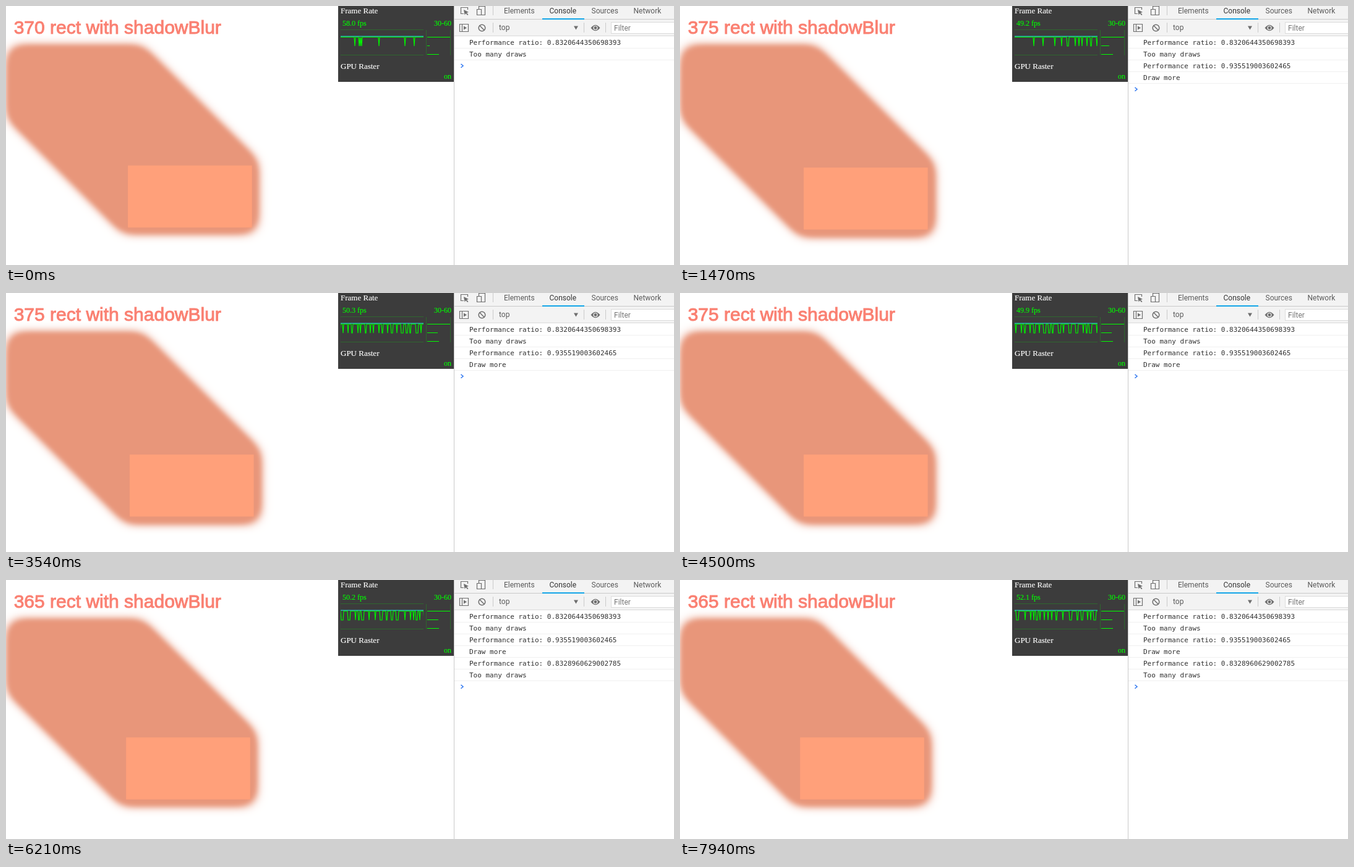
An HTML page with a canvas that plays this animation: 1080 by 420 pixels, repeating every 8 s.

```html
<!DOCTYPE html>
<html lang="en">
<head>
<meta charset="utf-8">
<title>Shadow load</title>
<style>
html, body { margin: 0; width: 100%; height: 100%; overflow: hidden; background: #fff; }
canvas, svg { position: absolute; left: 0; top: 0; display: block; }
text { white-space: pre; }
.title { font: 30px "Liberation Sans", Arial, sans-serif; fill: #fa8072; stroke: #fa8072; stroke-width: 1; }
.meter { font-family: "Liberation Serif", serif; }
.ui { font: 12px Roboto, sans-serif; fill: #5a5a5a; }
.log { font: 11px "DejaVu Sans Mono", monospace; fill: #303030; }
.icon { fill: none; stroke: #6e6e6e; stroke-width: 1.2; }
</style>
</head>
<body>
<svg id="stage" width="1080" height="420" viewBox="0 0 1080 420">
  <text id="title" class="title" x="12.7" y="45"></text>
  <rect id="front" width="200.5" height="100.5" fill="#ffa07a"/>
  <g class="meter">
    <rect x="537" width="187" height="123" fill="#3c3c3c"/>
    <g font-size="13" fill="#fff" stroke="#fff" stroke-width=".15">
      <text x="541" y="12">Frame Rate</text>
      <text x="541" y="102">GPU Raster</text>
    </g>
    <g font-size="12" fill="#0f0" stroke="#0f0" stroke-width=".15">
      <text id="fps" x="544" y="32"></text>
      <text x="720" y="32" text-anchor="end">30-60</text>
      <text x="720" y="118" text-anchor="end">on</text>
    </g>
    <path d="M541 38.5H675M541 79.5H675M679.5 39V80M718.5 39V80" stroke="#0f0" stroke-opacity=".22"/>
    <svg x="541" y="36" width="134" height="46" viewBox="541 36 134 46">
      <path id="graph" fill="none" stroke="#00f000" stroke-width="1.2"/>
    </svg>
    <path d="M541 48.5H675" stroke="#2c7878"/>
    <path d="M541 49.5H675" stroke="#30b0a4"/>
    <path id="bars" fill="none" stroke="#0f0" stroke-width="1.2"/>
  </g>
  <rect x="724" width="356" height="420" fill="#fff"/>
  <rect x="725" width="355" height="48" fill="#f3f3f3"/>
  <path d="M724.5 0V420M725 21.5H1080M787.5 0V15M787.5 27V43M934.5 27V43M969.5 27V43" stroke="#cacaca"/>
  <path d="M725 48.5H1080" stroke="#dadada"/>
  <rect x="978.5" y="26.5" width="110" height="18" fill="#fff" stroke="#dcdcdc"/>
  <rect x="867" y="20" width="68" height="2" fill="#12a5e8"/>
  <g class="ui">
    <text x="805" y="12">Elements</text>
    <text x="878.5" y="12" fill="#333">Console</text>
    <text x="946.5" y="12">Sources</text>
    <text x="1014.5" y="12">Network</text>
    <text x="797" y="39">top</text>
    <text x="983" y="40" fill="#777">Filter</text>
  </g>
  <g class="icon">
    <path d="M740 12.5H735.5V2.5H746.5V6"/>
    <path d="M740 6L748 10L744.7 11L747.5 14L746 15L743.5 12L741.6 14.5Z" fill="#6e6e6e" stroke="none"/>
    <path d="M764.5 5V.5H774.5V14.5H769M761.5 5.5H768.5V14.5H761.5Z"/>
    <path d="M733.5 29.5H747.5V41.5H733.5ZM737.5 29.5V41.5"/>
    <path d="M740 32.5L745 35.5L740 38.5Z" fill="#6e6e6e" stroke="none"/>
    <circle cx="769.5" cy="35.5" r="5.3" stroke-width="1.5"/>
    <path d="M765.8 31.8L773.2 39.2" stroke-width="1.5"/>
    <path d="M918 32.5H925L921.5 38.5Z" fill="#6e6e6e" stroke="none"/>
    <path d="M945.5 35.5Q953 26 960.5 35.5Q953 45 945.5 35.5Z" fill="#6e6e6e" stroke="none"/>
    <circle cx="953" cy="35.5" r="3" fill="#6e6e6e" stroke="#f3f3f3"/>
  </g>
  <g id="log" class="log"></g>
  <path id="prompt" d="M735.5 94L739 97L735.5 100" fill="none" stroke="#367cf1" stroke-width="1.6"/>
</svg>
<script>
const LOOP = 8000, FRAME = 90, SPEED = 0.05085;
const W = 440, H = 400, SIGMA = 10;
const $ = id => document.getElementById(id);

const states = [
  { from: 0, count: 370, rows: 2 },
  { from: 450, count: 375, rows: 4 },
  { from: 4590, count: 365, rows: 6 }
];
const rates = ["58.0", "54.6", "49.2", "50.1", "50.3", "49.9", "50.2", "51.0", "52.1"];
const lines = [
  "Performance ratio: 0.8320644350698393", "Too many draws",
  "Performance ratio: 0.935519003602465", "Draw more",
  "Performance ratio: 0.8328960629002785", "Too many draws"
];

// Slow samples along the frame graph: sparse at first, then seeded bursts
function makeDips() {
  let seed = 11;
  const rnd = () => (seed = seed * 16807 % 2147483647) / 2147483647;
  const list = [564, 571, 573, 575, 603, 645, 660];
  for (let x = 679; x < 1090;) {
    const run = Math.floor(1 + 3.5 * rnd() ** 2);
    for (let i = 0; i < run; i++) list.push(x++);
    x += Math.round((x < 710 ? 8 : 3) + 7 * rnd() ** 1.5);
  }
  return list;
}
const dips = makeDips();

// Smooth step with a Gaussian slope
const soft = z => 1 / (1 + Math.exp(-1.5976 * z - 0.07056 * z ** 3));
const span = (n, at, size) => Float32Array.from({ length: n }, (_, p) =>
  soft((p + 0.5 - at) / SIGMA) - soft((p + 0.5 - at - size) / SIGMA));

const corner = n => [200 - (375 - n) * 0.58, 262 - (375 - n) * 0.67];

// Accumulated blurred shadows of all rectangles; each pass stands for four of them
function shadow({ count }) {
  const [endX, endY] = corner(count);
  const clear = new Float32Array(W * H).fill(1);
  for (let i = 2; i < count; i += 4) {
    const k = i / count;
    const across = span(W, 13 + (endX - 13) * k, 200.5);
    const down = span(H, 75 + (endY - 75) * k, 100.5);
    for (let y = 0; y < H; y++) {
      if (down[y] < 0.001) continue;
      for (let x = 0; x < W; x++) clear[y * W + x] *= 1 - across[x] * down[y];
    }
  }
  const c = document.createElement("canvas");
  c.width = W;
  c.height = H;
  const g = c.getContext("2d");
  const img = g.createImageData(W, H);
  clear.forEach((v, i) => img.data.set([232, 150, 122, 255 * (1 - v ** 4)], i * 4));
  g.putImageData(img, 0, 0);
  document.body.insertBefore(c, $("stage"));
  return c;
}
const shadows = states.map(shadow);

$("log").innerHTML = lines.map((s, i) =>
  `<g><text x="749" y="${63 + 19 * i}">${s}</text>` +
  `<path d="M725 ${68.5 + 19 * i}H1080" stroke="#f0f0f0"/></g>`).join("");
const rows = [...$("log").children];

function graphPath(shift) {
  let d = "M540 50.5", last = 0;
  for (const p of dips) {
    const x = p - shift;
    if (x < 539 || x > 676) continue;
    if (x - last > 1) d += `${last ? `L${last + 1} 50.5` : ""}L${x - 1} 50.5`;
    d += `L${x} 65`;
    last = x;
  }
  return d + (last ? `L${last + 1} 50.5` : "") + "L676 50.5";
}

function draw(time) {
  const t = Math.floor(time / FRAME + 0.001) * FRAME;
  const state = states.filter(s => s.from <= t).pop();
  const [x, y] = corner(state.count);
  shadows.forEach((c, i) => c.style.visibility = states[i] === state ? "visible" : "hidden");
  rows.forEach((r, i) => r.setAttribute("display", i < state.rows ? "inline" : "none"));
  $("front").setAttribute("transform", `translate(${x} ${y})`);
  $("title").textContent = state.count + " rect with shadowBlur";
  $("prompt").setAttribute("transform", `translate(0 ${19 * (state.rows - 2)})`);
  $("fps").textContent = rates[Math.floor((t + 520) / 970)] + " fps";
  $("graph").setAttribute("d", graphPath(Math.round(t * SPEED)));
  const mid = Math.round(18 - 14 * Math.exp(-t / 1500));
  $("bars").setAttribute("d", `M681 50.5H718M681 64.5h${mid}M681 78.5h19`);
}

const start = performance.now();
function tick() {
  draw((performance.now() - start) % LOOP);
  requestAnimationFrame(tick);
}
tick();
</script>
</body>
</html>
```
